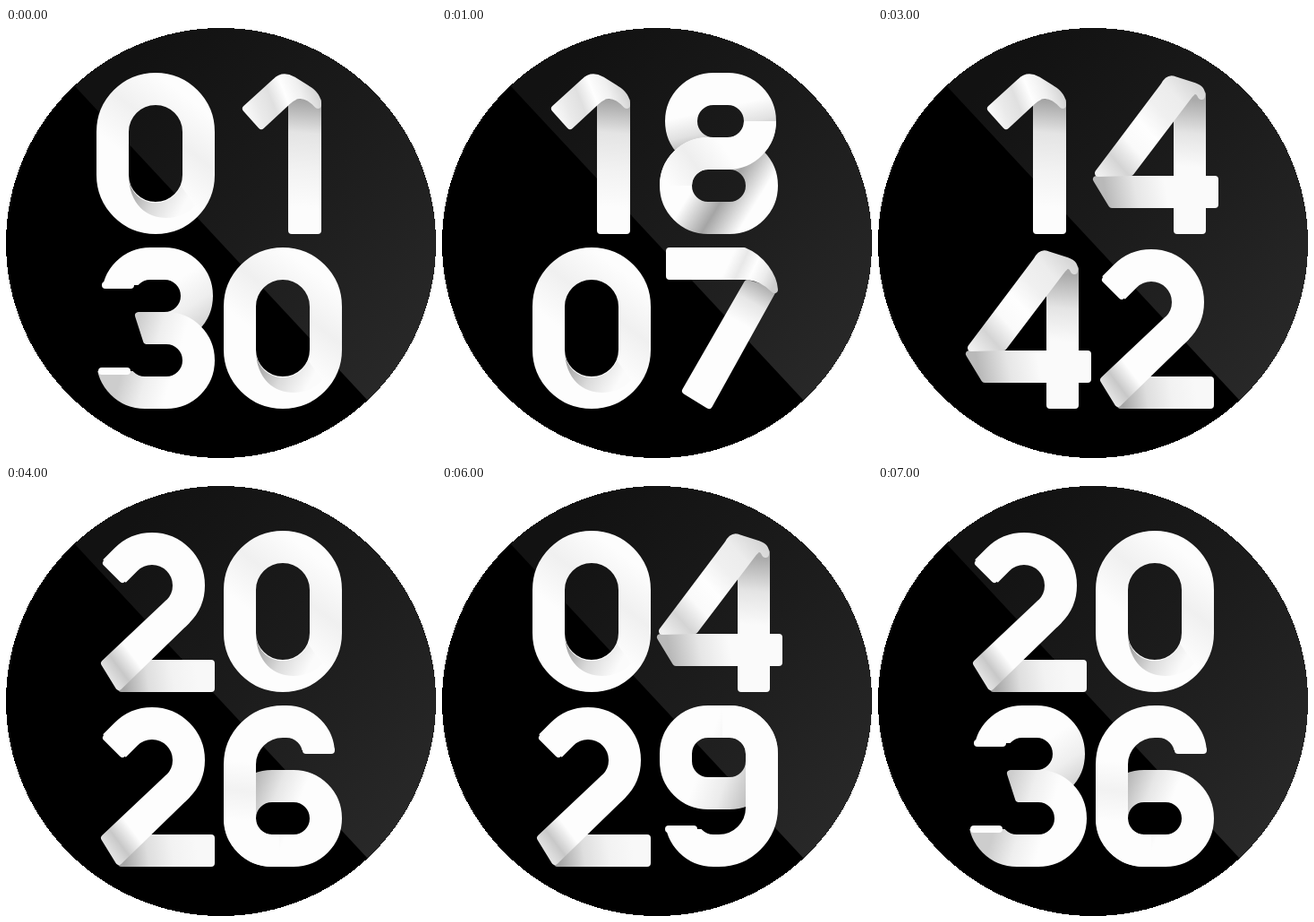
These frames come from a looping animation (480x480 px, 8 s). An HTML page with a canvas:

```html
<!DOCTYPE html>
<html lang="en">
<head>
<meta charset="utf-8">
<title>Ribbon clock</title>
<style>
html, body { margin: 0; width: 100%; height: 100%; overflow: hidden; background: #fff; }
canvas { display: block; }
</style>
</head>
<body>
<canvas id="stage" width="480" height="480"></canvas>
<script>
const ctx = document.getElementById('stage').getContext('2d');
const times = ['0130', '1807', '2309', '1442', '2026', '1038', '0429', '2036'];
const white = '#fdfdfd';
const radius = 240;

// Linear gradient through evenly spaced grey levels
function shade(x0, y0, x1, y1, ...greys) {
  const g = ctx.createLinearGradient(x0, y0, x1, y1);
  greys.forEach((v, i) => g.addColorStop(i / (greys.length - 1), `rgb(${v},${v},${v})`));
  return g;
}

function stroke(path, width, cap, paint) {
  ctx.lineWidth = width;
  ctx.lineCap = cap;
  ctx.strokeStyle = paint;
  ctx.stroke(path);
}

const band = (d, paint = white) => stroke(new Path2D(d), 36, 'butt', paint);

function ring(x, y, w, h, r, paint = white) {
  const path = new Path2D();
  path.roundRect(x, y, w, h, r);
  stroke(path, 36, 'butt', paint);
}

// Filled shape grown by 4 px, which rounds its corners
function soft(d, paint = white) {
  const path = new Path2D(d);
  ctx.fillStyle = paint;
  ctx.fill(path);
  stroke(path, 8, 'round', paint);
}

// Rounded end of a vertical band
const lip = (x, y) => soft(`M${x + 4} ${y}h28`);

// Draws with a rectangle left out
function without(x, y, w, h, paintShape) {
  ctx.save();
  ctx.beginPath();
  ctx.rect(-20, -20, 180, 220);
  ctx.rect(x, y, w, h);
  ctx.clip('evenodd');
  paintShape();
  ctx.restore();
}

const upperLoop = paint => ring(24, 18, 88, 72, 36, paint);
const lowerLoop = paint => ring(18, 90, 96, 72, 36, paint);

// Each digit is drawn in a 132 x 180 cell
const digits = {
  0() {
    ring(18, 18, 96, 144, 48, shade(20, 82, 76, 8, 253, 240, 253));
    ctx.fillStyle = shade(38, 128, 92, 158, 160, 218, 251);
    ctx.fill(new Path2D('M36 114A30 30 0 0 0 94 126L110 148C90 172 36 168 36 114Z'));
  },
  1() {
    soft('M76 34L105 32V176H76Z', shade(95, 26, 86, 150, 155, 228, 242, 252));
    soft('M25 40L58 10Q66 2 77 8L93 18Q105 25 105 36Q93 22 80 26Q75 28 70 33L42 59Z',
      shade(30, 60, 106, 30, 250, 234, 224, 254, 240, 215));
  },
  2() {
    soft('M28 148H128V176H28Z', shade(30, 172, 112, 160, 165, 222, 242, 248));
    band('M20 45L33 32A41 41 0 0 1 91 90L86 95');
    soft('M11 36L29 54');
    soft('M80 81L100 101L25 174L9 148Z', shade(10, 166, 42, 142, 235, 200, 253));
  },
  3() {
    without(-20, 42, 86, 80, () => upperLoop(shade(88, 38, 124, 92, 253, 238, 205)));
    lip(6, 42);
    const fold = shade(48, 76, 100, 92, 205, 238, 253);
    without(-20, 60, 75, 78, () => lowerLoop(fold));
    soft('M47 76H70V104H56Z', fold);
    lip(2, 138);
  },
  4() {
    soft('M91 40L119 24V176H91Z', shade(110, 30, 104, 105, 170, 228, 250));
    soft('M1 119H133V147H18Z', shade(12, 140, 78, 128, 185, 230, 250));
    soft('M3 112L76 15Q81 5 88 8L110 15Q119 18 118 26Q113 15 105 24L39 111Z',
      shade(2, 112, 112, 14, 240, 212, 250, 254, 240, 236, 215));
  },
  6() {
    lowerLoop(shade(38, 78, 88, 98, 185, 230, 253));
    without(62, 50, 90, 150, () =>
      ring(18, 18, 88, 144, [48, 36, 36, 36], shade(10, 128, 16, 62, 253, 242, 253)));
    lip(88, 50);
  },
  7() {
    soft('M98 40L126 48L55 176L29 160Z', shade(116, 38, 90, 84, 165, 230, 253));
    soft('M11 4H94C114 12 127 32 128 47Q116 34 98 32H11Z',
      shade(60, 20, 124, 50, 253, 253, 232, 254, 236, 205));
  },
  8() {
    upperLoop(shade(40, 92, 30, 48, 165, 225, 253));
    lowerLoop(shade(64, 86, 122, 122, 253, 165, 253));
    band('M18 126A36 36 0 0 1 54 90H76A36 36 0 0 0 112 54', shade(12, 128, 72, 84, 253, 238, 253));
  },
  9() {
    ring(18, 18, 96, 80, 36, shade(104, 94, 44, 72, 190, 235, 253));
    without(-20, -20, 90, 158, () => ring(24, 18, 90, 144, [36, 36, 48, 36]));
    lip(6, 138);
  }
};

function drawFace() {
  ctx.clearRect(0, 0, 480, 480);
  ctx.fillStyle = '#000';
  // Whole-pixel rows give the disc its hard edge
  for (let y = 0; y < 2 * radius; y++) {
    const half = Math.round(Math.sqrt(radius ** 2 - (y + 0.5 - radius) ** 2));
    ctx.fillRect(radius - half, y, 2 * half, 1);
  }
  ctx.globalCompositeOperation = 'source-atop';
  ctx.fillStyle = shade(100, 80, 420, 400, 18, 28, 40);
  const edge = Math.atan2(176, 164);
  ctx.beginPath();
  ctx.arc(radius, radius, 2 * radius, edge - Math.PI, edge);
  ctx.fill();
  ctx.globalCompositeOperation = 'source-over';
}

function draw(now) {
  const time = times[Math.floor(now / 1000) % times.length];
  drawFace();
  ctx.lineJoin = 'round';
  [...time].forEach((digit, i) => {
    ctx.save();
    ctx.translate(101 + 142 * (i % 2), 50 + 195 * (i >> 1));
    digits[digit]();
    ctx.restore();
  });
}

let start;
function tick(now) {
  start ??= now;
  draw(now - start);
  requestAnimationFrame(tick);
}
requestAnimationFrame(tick);
</script>
</body>
</html>
```
